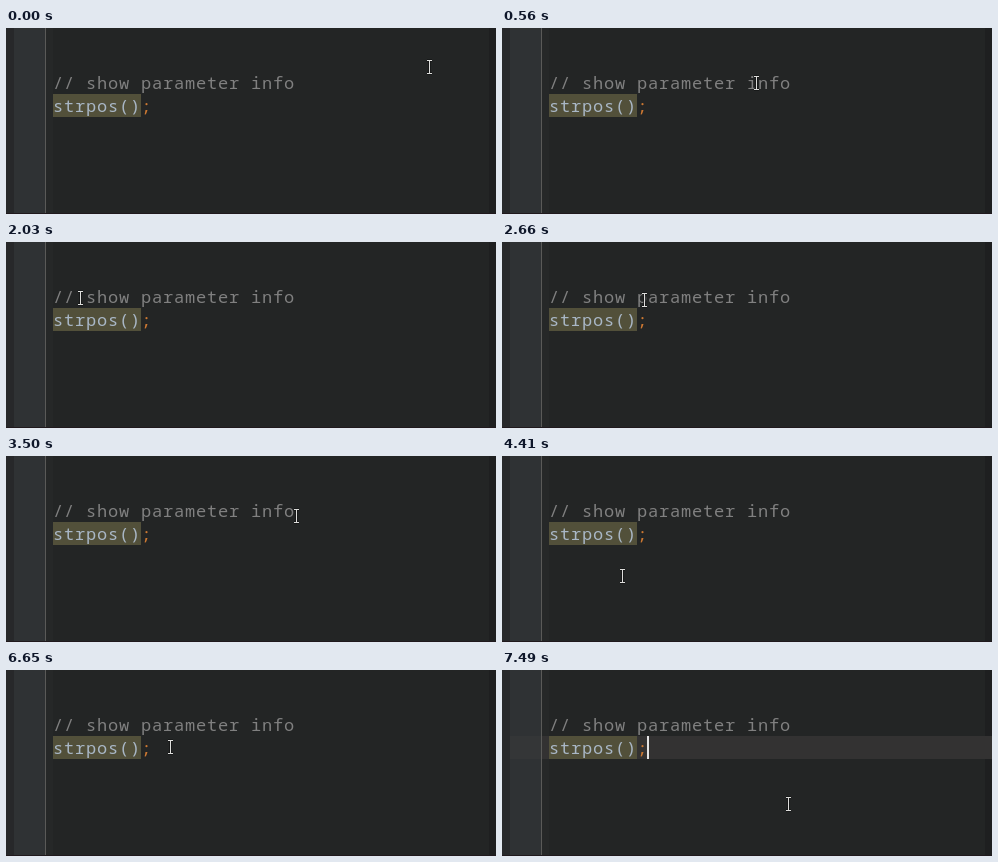
Write an HTML page that moves like this. It is 490 px wide and 186 px high and loops after 8000 ms.

```html
<!DOCTYPE html>
<html lang="en">
<head>
<meta charset="utf-8">
<title>Editor</title>
<style>
  html, body { margin: 0; width: 100%; height: 100%; overflow: hidden; background: #232525; }
  svg { display: block; width: 490px; height: 186px; }
  text { font: 17px "Noto Sans Mono", "DejaVu Sans Mono", monospace; letter-spacing: .8px; white-space: pre; }
</style>
</head>
<body>
<svg viewBox="0 0 490 186">
  <rect width="490" height="186" fill="#232525"/>
  <rect width="8" height="186" fill="#27282a"/>
  <rect x="8" width="31" height="186" fill="#2f3234"/>
  <rect x="40" width="7" height="186" fill="#262828"/>
  <rect x="483" width="7" height="186" fill="#1e1f20"/>
  <g id="row" visibility="hidden">
    <rect x="8" y="66" width="31" height="23" fill="#343637"/>
    <rect x="40" y="66" width="450" height="23" fill="#333232"/>
  </g>
  <rect x="39" width="1" height="186" fill="#5a5a58"/>
  <rect y="185" width="490" height="1" fill="#20191d"/>
  <rect x="47" y="66" width="88" height="23" fill="#52503a"/>
  <text x="47" y="61" fill="#808080">// show parameter info</text>
  <text x="47" y="84" fill="#a9b7c6">strpos()<tspan fill="#cc7832">;</tspan></text>
  <rect id="caret" x="145" y="66" width="2" height="23" fill="#e4e4e4" visibility="hidden"/>
  <g id="mouse" fill="none">
    <path id="beam" d="M-2 -6.5H3M.5 -6.5V6.5M-2 6.5H3"/>
    <use href="#beam" stroke="#151616" stroke-width="2.4"/>
    <use href="#beam" stroke="#dededc"/>
  </g>
</svg>
<script>
const LOOP = 8000, STEP = 70, CLICK = 6720;

// Each pointer move: start, end, goal x, goal y, downward bow
const moves = [
  [0, 770, 216, 58, 0],
  [1050, 1610, 62, 55, 5],
  [1890, 2170, 86, 57, 0],
  [2220, 3500, 290, 60, 0],
  [3710, 4760, 61, 96, 44],
  [5110, 5600, 133, 103, 0],
  [5950, 6440, 164, 77, 0],
  [6650, 6860, 206, 71, 0],
  [7000, 7490, 286, 134, 0]
];

const $ = id => document.getElementById(id);
const clamp = u => Math.max(0, Math.min(1, u));
const ease = u => u * u * (3 - 2 * u);

function pointer(t) {
  let x = 423, y = 39;
  for (const [start, end, goalX, goalY, bow] of moves) {
    const s = ease(clamp((t - start) / (end - start)));
    x += (goalX - x) * s;
    y += (goalY - y) * s + bow * 4 * s * (1 - s);
  }
  return [Math.round(x), Math.round(y)];
}

function draw(now) {
  const t = Math.floor((now % LOOP) / STEP) * STEP;
  $("mouse").setAttribute("transform", `translate(${pointer(t)})`);
  const shown = t >= CLICK ? "visible" : "hidden";
  $("row").setAttribute("visibility", shown);
  $("caret").setAttribute("visibility", shown);
}

const begin = performance.now();
function tick() {
  draw(performance.now() - begin);
  requestAnimationFrame(tick);
}
tick();
</script>
</body>
</html>
```
